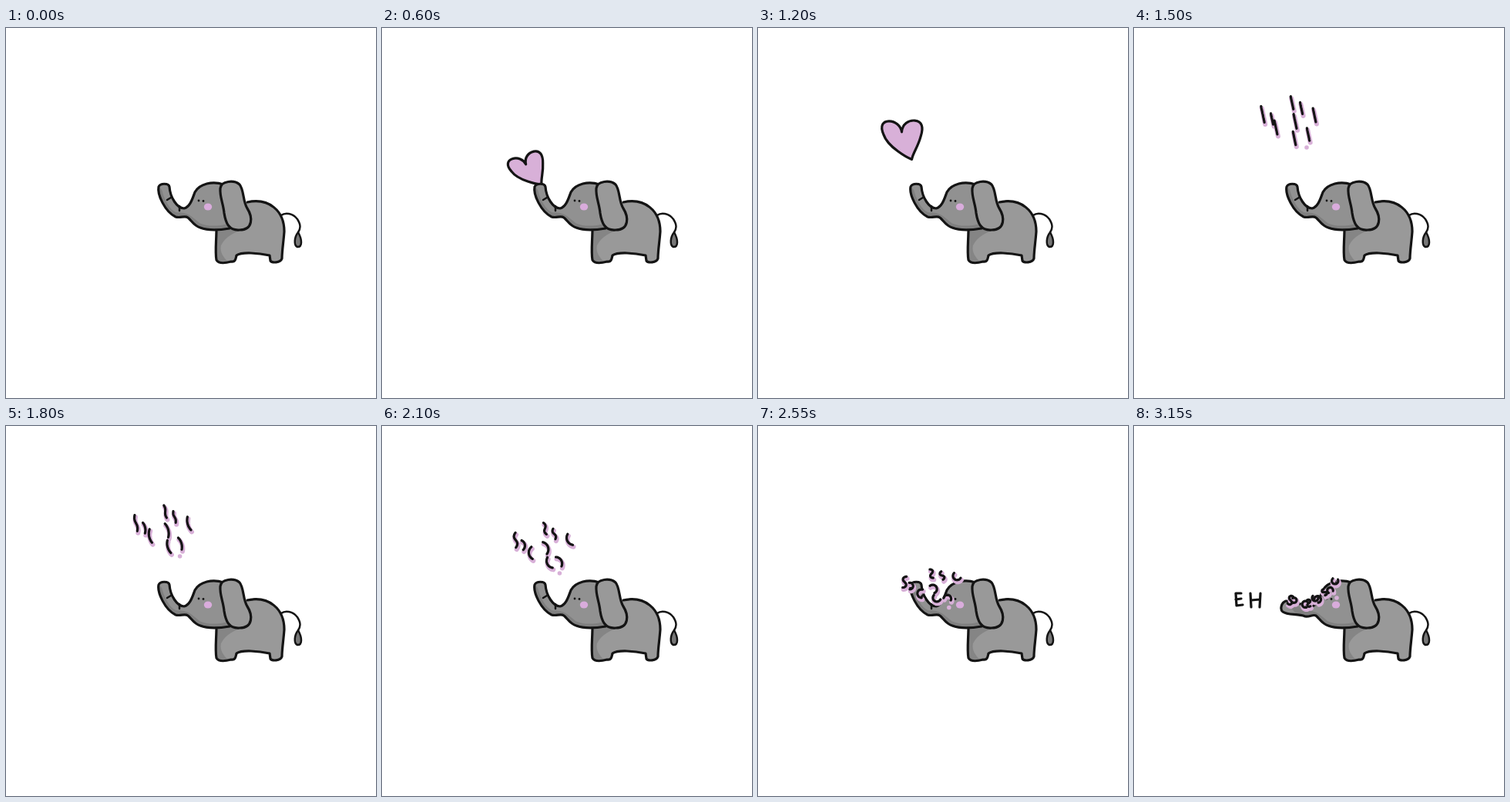
These frames come from a looping animation (480x480 px, 3300 ms). An HTML page:

```html
<!DOCTYPE html>
<html lang="en">
<head>
<meta charset="utf-8">
<title>Elephant and heart</title>
<style>
  html, body { margin: 0; width: 100%; height: 100%; overflow: hidden; background: #fff; }
  svg { display: block; width: 100vw; height: 100vh; }
  .line { stroke: #141414; stroke-width: 3.2; }
  .fine { stroke: #141414; stroke-width: 2.5; }
  .pink { stroke: #d8b0d8; stroke-width: 6; }
</style>
</head>
<body>
<svg viewBox="0 0 480 480" fill="none" stroke-linecap="round" stroke-linejoin="round">
  <defs>
    <path id="body" d="M313 226C341 220 361 237 361 264C360 278 358 289 358 299C356 305 345 305 343 302L342 295C328 292 306 290 299 295C298 299 298 304 292 303C285 305 276 306 273 301C271 290 273 276 273 260"/>
    <path id="head"/>
    <clipPath id="headClip"><use href="#head"/></clipPath>
    <path id="face" d="M203 226C210 221 216 233 225 230C241 229 245 213 260 205"/>
  </defs>

  <path class="fine" d="M357 243C362 239 372 240 378 248C383 256 382 260 379 265"/>
  <path class="fine" fill="#777" d="M379 265C374 271 373 282 378 284C385 284 384 274 379 265"/>

  <use href="#body" fill="#999"/>
  <path fill="#858585" d="M273 260H312C298 264 285 270 279 282C277 290 282 298 288 303C278 306 273 303 273 298Z"/>
  <use href="#body" class="line"/>

  <path id="heart" class="line" fill="#d8b0d8" vector-effect="non-scaling-stroke"
    d="M0 0C-5 -2 -30 -16 -35 -32C-40 -44 -35 -49 -28 -49C-20 -49 -13 -43 -12 -35C-11 -45 -3 -50 5 -49C14 -48 16 -40 12 -29C8 -15 2 -9 0 0Z"/>

  <use href="#head" fill="#919191"/>
  <path clip-path="url(#headClip)" stroke="#808080" stroke-width="9" d="M198 212C203 231 213 243 222 244C234 242 240 250 249 257C262 263 275 262 290 258"/>
  <use href="#head" class="line"/>
  <path id="creases" class="fine" d="M209 223L214 220M225 231L225 237"/>
  <ellipse cx="262" cy="232" rx="5.2" ry="4.6" fill="#d9acdc"/>
  <g fill="#141414"><circle cx="250" cy="224" r="1.4"/><circle cx="256" cy="224.5" r="1.4"/></g>
  <path class="line" fill="#999" d="M278 208C279 198 296 197 303 203C309 210 307 225 313 234C320 245 321 262 303 262C289 263 285 253 283 240C282 228 277 219 278 208Z"/>

  <g id="scraps">
    <path id="scrapPink" class="pink" transform="translate(1 2.5)"/>
    <circle id="drop" r="2.8" fill="#d8b0d8"/>
    <path id="scrapLine" class="line"/>
  </g>
  <path id="word" class="line" aria-label="EH" d="M139 217L132 217L133 233L141 232M132 225L139 224M151 217L152 235M164 217L163 235M152 226L163 225"/>
</svg>
<script>
const STEP = 150, STEPS = 22, FREE = 5, POP = 10, LAND = 19;
const el = id => document.getElementById(id);
const show = (id, on) => el(id).style.display = on ? '' : 'none';
const set = (id, attrs) => Object.entries(attrs).forEach(([k, v]) => el(id).setAttribute(k, v));
const clamp = v => Math.min(1, Math.max(0, v));
const mix = (a, b, f) => a + (b - a) * f;
const noise = n => { const v = Math.sin(n * 12.9898) * 43758.5453; return v - Math.floor(v); };

const trunkUp = '239 232 231 234C222 234 213 220 212 206C211 201 200 201 198 206C196 216 206 238 220 245C226 247 232 243 236 246';
const trunkDown = '238 233 230 234C222 234 208 227 197 227C191 229 189 238 193 241C200 246 212 243 222 247C228 248 232 244 236 246';

// where each scrap of the burst heart starts, left to right
const burst = [[167, 112], [179, 118], [184, 129], [205, 97], [208, 143], [209, 121], [217, 104], [226, 138], [234, 113]];

// grows on the trunk, then floats up while turning upright
function drawHeart(k) {
  const t = clamp((k - FREE) / 4), lag = (1 - t) ** 2;
  const size = k < FREE ? mix(.28, 1.1, (k - 1) / 4) : 1 + .1 * (2 * t - 1) ** 2;
  const x = 199 + 8 * lag, y = 203 - 46 * t ** 1.2;
  set('heart', { transform: `translate(${x} ${y}) rotate(${-19 * lag}) scale(${size})` });
}

// free fall with a sideways drift that settles at a resting point
function fall([x, y], rest, s) {
  const settle = clamp((s - 4) / 5) ** 3;
  return [mix(x + .4 * s * s, rest.x, settle), mix(y + 5 * s + s * s, rest.y, settle)];
}

// a ribbon drawn outwards from its middle, curling up as it falls
function ribbon([x, y], i, s) {
  const half = 7 + 4 * noise(i + 1), side = i % 2 ? 1 : -1, parts = 6;
  const angle = 78 + 200 * (noise(i + 20) - .5) * (s / 9) ** 2;
  const bend = side * 28 * s;
  const arm = dir => {
    const pts = [];
    let px = x, py = y;
    for (let n = 0; n < parts; n++) {
      const u = (n + .5) / parts;
      const turn = i % 3 ? dir * u / 2 : Math.cos(Math.PI * u) / 3;
      const a = (angle + bend * turn) * Math.PI / 180;
      px += dir * Math.cos(a) * half / parts;
      py += dir * Math.sin(a) * half / parts;
      pts.push(px.toFixed(1) + ' ' + py.toFixed(1));
    }
    return pts;
  };
  return 'M' + [...arm(-1).reverse(), `${x} ${y}`, ...arm(1)].join('L');
}

function drawScraps(k) {
  const s = Math.min(k, LAND) - POP, face = el('face'), length = face.getTotalLength();
  const d = burst.map((p, i) => {
    const rest = face.getPointAtLength(length * i / (burst.length - 1));
    return ribbon(fall(p, rest, s), i, s);
  }).join('');
  set('scrapPink', { d });
  set('scrapLine', { d });
  const [cx, cy] = fall([224, 155], { x: 263, y: 223 }, s);
  set('drop', { cx, cy });
}

function draw(k) {
  const landed = k >= LAND, popped = k >= POP;
  set('head', { d: `M282 203C268 198 251 202 245 213C242 221 ${landed ? trunkDown : trunkUp}C240 249 244 257 252 259C262 263 278 262 290 260` });
  show('creases', !landed);
  show('word', landed);
  show('heart', k > 0 && !popped);
  show('scraps', popped);
  if (popped) drawScraps(k);
  else drawHeart(k);
}

const start = performance.now();
let last = -1;
function tick() {
  const k = Math.floor((performance.now() - start) / STEP) % STEPS;
  if (k !== last) draw(last = k);
  requestAnimationFrame(tick);
}
tick();
</script>
</body>
</html>
```
